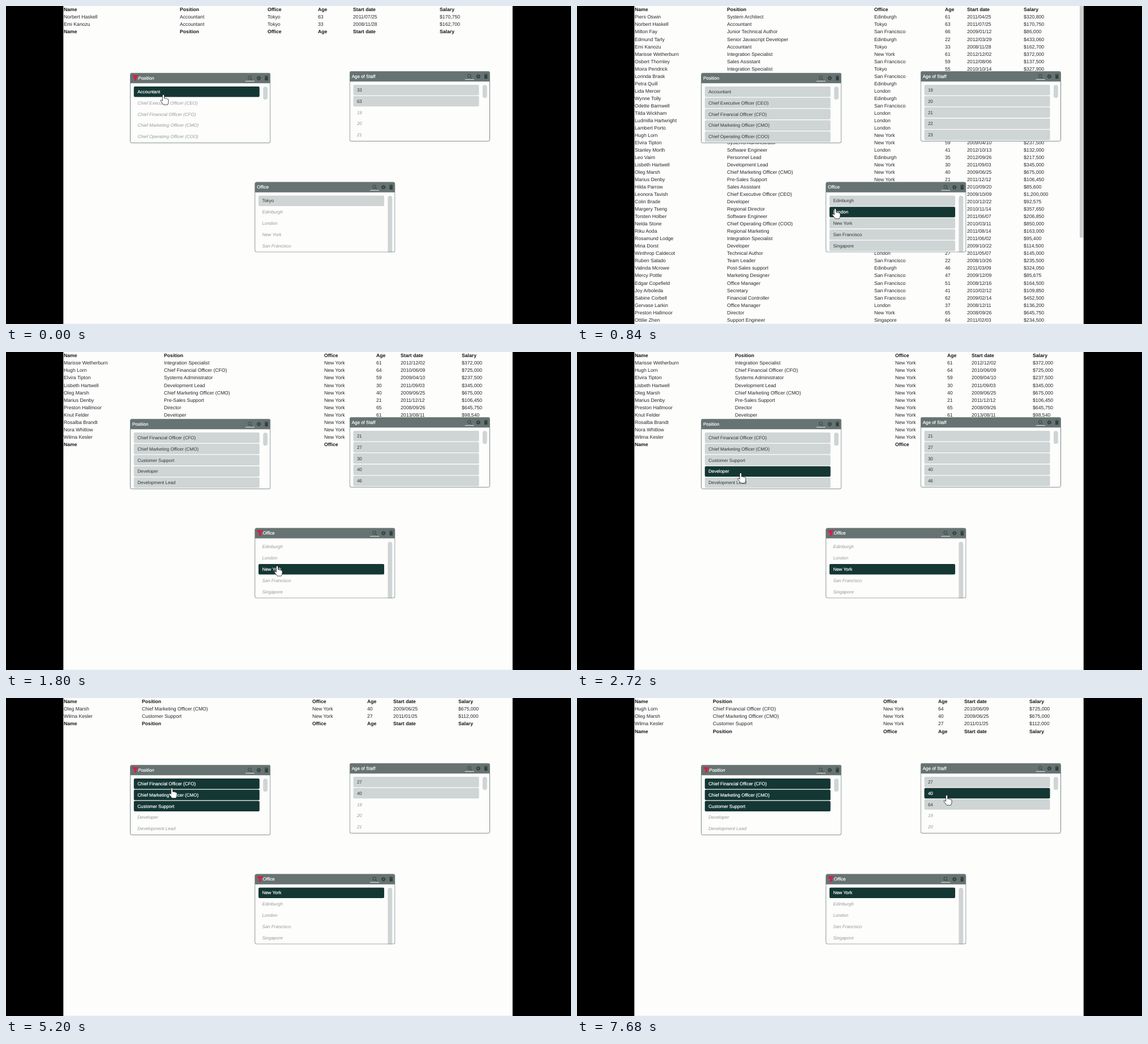
Animation, 998 px wide and 561 px high, one loop 8 s. Source, as an HTML page:

```html
<!DOCTYPE html>
<html lang="en">
<head>
<meta charset="utf-8">
<title>Staff filter</title>
<style>
html, body { margin: 0; width: 100%; height: 100%; overflow: hidden; background: #000; }
svg { display: block; text-rendering: geometricPrecision; }
text { font: 8px "Liberation Sans", Arial, sans-serif; fill: #2f3535; white-space: pre; }
.cell { font-size: 8.67px; fill: #242728; }
.head { font-weight: bold; fill: #141617; }
.off { font-style: italic; fill: #939a99; }
.on, .title { fill: #fff; stroke: #fff; stroke-width: .2; }
.filtered { font-style: italic; }
.icon { fill: none; stroke: #30403f; }
</style>
</head>
<body>
<svg width="998" height="561" viewBox="0 0 998 561">
  <rect x="101.3" width="793.5" height="561" fill="#fdfdfc"/>
  <rect x="101.3" y="560" width="793.5" height="1" fill="#f1f1f9"/>
  <g id="page"></g>
  <path id="cursor" fill="#fff" stroke="#222" stroke-width=".8" stroke-linejoin="round"/>
</svg>
<script>
const HEAD = ['Name', 'Position', 'Office', 'Age', 'Start date', 'Salary'];
// Cells that always lie under a panel are left empty.
const STAFF = `Piers Oswin|System Architect|Edinburgh|61|2011/04/25|$320,800
Norbert Haskell|Accountant|Tokyo|63|2011/07/25|$170,750
Milton Fay|Junior Technical Author|San Francisco|66|2009/01/12|$86,000
Edmund Tarly|Senior Javascript Developer|Edinburgh|22|2012/03/29|$433,060
Emi Kanozu|Accountant|Tokyo|33|2008/11/28|$162,700
Marisse Wetherburn|Integration Specialist|New York|61|2012/12/02|$372,000
Osbert Thornley|Sales Assistant|San Francisco|59|2012/08/06|$137,500
Moira Pendrick|Integration Specialist|Tokyo|55|2010/10/14|$327,900
Lorinda Brask||San Francisco
Petra Quill||Edinburgh
Lida Mercer||London
Wynne Tolly||Edinburgh
Odette Barnwell||San Francisco
Tilda Wickham||London
Ludmilla Hartwright||London
Lambert Porto||London
Hugh Lorn|Chief Financial Officer (CFO)|New York|64|2010/06/09|$725,000
Elvira Tipton|Systems Administrator|New York|59|2009/04/10|$237,500
Stanley Morth|Software Engineer|London|41|2012/10/13|$132,000
Leo Vaim|Personnel Lead|Edinburgh|35|2012/09/26|$217,500
Lisbeth Hartwell|Development Lead|New York|30|2011/09/03|$345,000
Oleg Marsh|Chief Marketing Officer (CMO)|New York|40|2009/06/25|$675,000
Marius Denby|Pre-Sales Support|New York|21|2011/12/12|$106,450
Hilda Parrow|Sales Assistant|||2010/09/20|$85,600
Leonora Tavish|Chief Executive Officer (CEO)|||2009/10/09|$1,200,000
Colin Brade|Developer|||2010/12/22|$92,575
Margery Tseng|Regional Director|||2010/11/14|$357,650
Torsten Holber|Software Engineer|||2011/06/07|$206,850
Nelda Stone|Chief Operating Officer (COO)|||2010/03/11|$850,000
Riku Aoda|Regional Marketing|||2011/08/14|$163,000
Rosamund Lodge|Integration Specialist|||2011/06/02|$95,400
Mina Dorst|Developer|||2009/10/22|$114,500
Winthrop Caldecot|Technical Author|London|27|2011/05/07|$145,000
Ruben Salado|Team Leader|San Francisco|22|2008/10/26|$235,500
Valinda Mcrowe|Post-Sales support|Edinburgh|46|2011/03/09|$324,050
Mercy Pottle|Marketing Designer|San Francisco|47|2009/12/09|$85,675
Edgar Copefield|Office Manager|San Francisco|51|2008/12/16|$164,500
Joy Arboleda|Secretary|San Francisco|41|2010/02/12|$109,850
Sabine Corbell|Financial Controller|San Francisco|62|2009/02/14|$452,500
Gervase Larkin|Office Manager|London|37|2008/12/11|$136,200
Preston Hallmoor|Director|New York|65|2008/09/26|$645,750
Ottilie Zhen|Support Engineer|Singapore|64|2011/02/03|$234,500
Knut Felder|Developer|New York|61|2013/08/11|$98,540
Rosalba Brandt||New York
Nora Whitlow||New York
Wilma Kesler|Customer Support|New York|27|2011/01/25|$112,000`
  .split('\n').map(line => line.split('|'));

const CFO = 'Chief Financial Officer (CFO)', CMO = 'Chief Marketing Officer (CMO)', CS = 'Customer Support';
const TITLES = ['Chief Executive Officer (CEO)', CFO, CMO, 'Chief Operating Officer (COO)'];
const NY_TITLES = [CFO, CMO, CS, 'Developer', 'Development Lead'];
const CITIES = ['Edinburgh', 'London', 'New York', 'San Francisco', 'Singapore'];

// Option prefix: * selected, - unavailable.
const off = list => list.map(s => '-' + s);
const pick = (list, ...sel) => list.map(s => (sel.includes(s) ? '*' : '-') + s);
const ages = (...list) => [...list, ...off([19, 20, 21, 22, 23])].slice(0, 5);

const NY_FIRST = ['*New York', ...off(CITIES.filter(c => c != 'New York'))];
const WIDE = [102, 240, 541, 638, 684, 799];
const byTitle = (from, cols, age, ...sel) => ({
  from, cols, rows: STAFF.filter(r => sel.includes(r[1])),
  lists: [pick(NY_TITLES, ...sel), ages(...age), NY_FIRST]
});
const STATES = [
  { from: 0, cols: [102, 307, 462, 551, 613, 766], rows: STAFF.filter(r => r[1] == 'Accountant'),
    lists: [['*Accountant', ...off(TITLES)], ages('33', '63'),
      ['Tokyo', ...off(CITIES.slice(0, 4))]] },
  { from: 360, cols: [102, 265, 525, 650, 689, 789], rows: STAFF, scroll: true,
    lists: [['Accountant', ...TITLES], ['19', '20', '21', '22', '23'], CITIES] },
  { from: 1800, cols: [102, 279, 562, 654, 697, 805], rows: STAFF.filter(r => r[2] == 'New York'),
    lists: [NY_TITLES, ['21', '27', '30', '40', '46'], pick(CITIES, 'New York')] },
  byTitle(3560, [102, 265, 481, 596, 651, 785], ['27'], CS),
  byTitle(4920, WIDE, ['27', '40'], CS, CMO),
  byTitle(5800, WIDE, ['27', '40', '64'], CS, CMO, CFO)
];

const PANELS = [
  { name: 'Position', x: 219, y: 117.7, thumb: 23 },
  { name: 'Age of Staff', x: 606.7, y: 114.7, thumb: 23 },
  { name: 'Office', x: 439.2, y: 310.2, thumb: 110 }
];
const ROW = { x: 6.8, y: 24.2, w: 222, h: 18.5, step: 19.85 };
const FRAME = 'x=".5" y=".5" width="247.3" height="123.4" rx="3"';

// Cursor tip: time, x, y
const PATH = [[0, 278, 157], [360, 278, 157], [840, 456, 358], [1160, 479, 378], [2240, 479, 378],
  [2720, 289, 214], [3040, 292, 188], [4080, 292, 188], [4320, 292, 169], [4600, 292, 169],
  [4720, 294, 170], [4920, 294, 170], [5480, 292, 149], [6080, 292, 149], [6400, 612, 176],
  [6840, 648, 184], [6920, 648, 184], [7680, 653, 172], [8000, 653, 172]];
const HAND = 'M-1.6 1Q-1.6-.7 0-.7T1.6 1V6Q3.1 5 4.1 6.4 5.6 5.7 6.4 7.1 9 6.5 9 9V12Q9 14.2 7.3 17.2H0Q-1.5 14.4-4.8 10.8-5.3 8.5-3.6 8.7L-1.6 10.4Z';
const ARROW = 'M0 0V13L3 10.3 5 15 7 14 5 9.6H9Z';

const text = (x, y, s, cls = '') => `<text x="${x}" y="${y}" class="${cls}">${s}</text>`;
const rect = (x, y, w, h, r, fill) => `<rect x="${x}" y="${y}" width="${w}" height="${h}" rx="${r}" fill="${fill}"/>`;

function table({ cols, rows, scroll }) {
  const out = [HEAD, ...rows, HEAD].map((r, i) => r.map((s, c) =>
    s && text(cols[c], 9.4 + i * 13.03, s, r == HEAD ? 'cell head' : 'cell')).join('')).join('');
  return out + (scroll ? rect(888, -4, 7, 413, 3, '#cdcdcd') : '');
}

function panel(p, list, hover) {
  const filtered = list.some(s => s[0] == '*');
  const rows = list.map((s, i) => {
    const mark = '*-'.includes(s[0]) ? s[0] : '', y = ROW.y + i * ROW.step;
    const dark = mark == '*' || hover == i;
    const box = dark || !mark ? rect(ROW.x, y, ROW.w, ROW.h, 2, dark ? '#143734' : '#ced5d4') : '';
    return box + text(13.2, y + 12, s.slice(mark.length), dark ? 'on' : mark ? 'off' : '');
  }).join('');
  return `<svg x="${p.x}" y="${p.y}" width="248.3" height="124.4">
    <rect ${FRAME} fill="#fdfdfc"/>
    <path d="M.5 18.5V3.5Q.5.5 3.5.5H244.8Q247.8.5 247.8 3.5V18.5Z" fill="#667372"/>
    ${rows}${rect(235.2, 24.5, 7.8, p.thumb, 3.9, '#ced5d4')}
    <rect ${FRAME} fill="none" stroke="#788782"/>
    ${filtered ? '<path d="M4.3 4.3H14.3V6L11.2 8.7V14H7.8V8.7L4.3 6Z" fill="#d51f48"/>' : ''}
    ${text(filtered ? 14.3 : 4, 12.2, p.name, filtered ? 'title filtered' : 'title')}
    <path d="M204 15H220" stroke="#e8ecec"/>
    <g class="icon"><circle cx="211.5" cy="8.6" r="2.8"/><path d="M213.6 10.7L216.3 13.2"/>
      <circle cx="227.5" cy="9.5" r="2.1" stroke-width="1.8"/>
      <circle cx="227.5" cy="9.5" r="3.5" stroke-dasharray="1.4 1.35"/>
      <path d="M237.5 6.2H244.5M239.7 5.5H242.3"/><path d="M241 7.2V13.5" stroke-width="5.4"/></g>
  </svg>`;
}

function cursorAt(t) {
  const i = PATH.findIndex(k => k[0] > t), [t0, x0, y0] = PATH[i - 1], [t1, x1, y1] = PATH[i];
  const u = (t - t0) / (t1 - t0), e = u * u * (3 - 2 * u);
  return [x0 + (x1 - x0) * e, y0 + (y1 - y0) * e];
}

function hoverRow(p, x, y) {
  const dx = x - p.x - ROW.x, dy = y - p.y - ROW.y, i = Math.floor(dy / ROW.step);
  return dx >= 0 && dx <= ROW.w && i >= 0 && i < 5 && dy - i * ROW.step <= ROW.h ? i : -1;
}

const page = document.getElementById('page'), cursor = document.getElementById('cursor');
let shown;

function draw(t) {
  const state = STATES.findLast(s => s.from <= t);
  const [x, y] = cursorAt(t);
  const hover = PANELS.map(p => hoverRow(p, x, y));
  const key = [state.from, ...hover].join();
  if (key != shown) {
    shown = key;
    page.innerHTML = table(state) + PANELS.map((p, i) => panel(p, state.lists[i], hover[i])).join('');
  }
  cursor.setAttribute('d', hover.some(i => i >= 0) ? HAND : ARROW);
  cursor.setAttribute('transform', `translate(${x} ${y})`);
}

const start = performance.now();
function tick() {
  draw((performance.now() - start) % 8000);
  requestAnimationFrame(tick);
}
tick();
</script>
</body>
</html>
```
